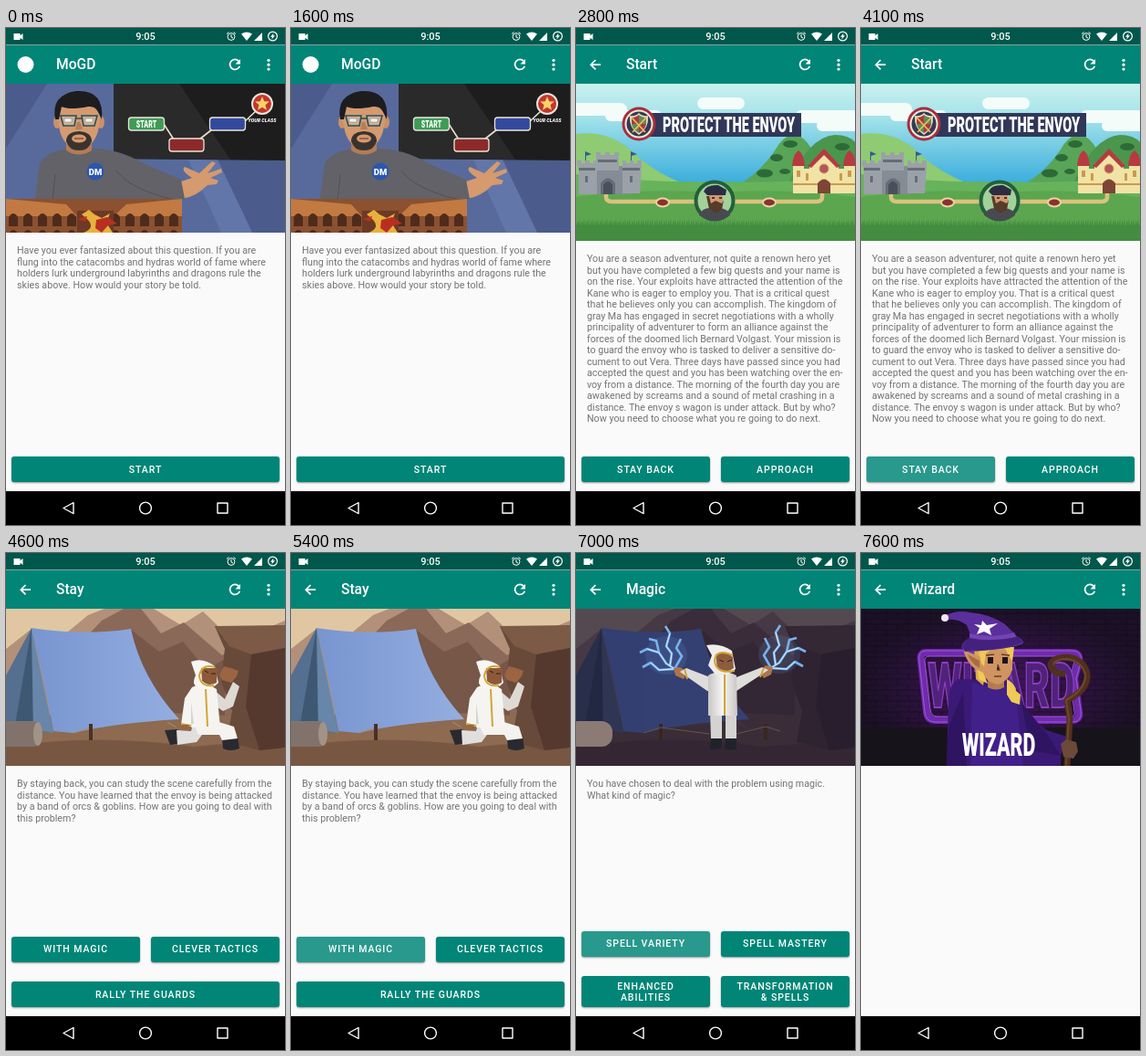
An HTML page that plays this animation: 306x544 px, repeating every 8000 ms.

```html
<!DOCTYPE html>
<html lang="en">
<head>
<meta charset="utf-8">
<title>Story app</title>
<style>
html, body { margin: 0; width: 100%; height: 100%; overflow: hidden; background: #000 }
#stage { position: absolute; left: 0; top: 0; width: 306px; height: 544px; overflow: hidden; font-family: Roboto, sans-serif }
.scr { position: absolute; left: 0; top: 0; width: 306px; height: 507px; overflow: hidden; background: #fafafa }
#start, #back { animation: start 8s step-end infinite }
#stay { animation: stay 8s step-end infinite }
#magic { animation: magic 8s step-end infinite }
#wizard { animation: wizard 8s step-end infinite }
#badge { animation: badge 8s step-end infinite }
@keyframes start { 0% { visibility: hidden } 32.5%, 100% { visibility: visible } }
@keyframes stay { 0% { visibility: hidden } 52.5%, 100% { visibility: visible } }
@keyframes magic { 0% { visibility: hidden } 70%, 100% { visibility: visible } }
@keyframes wizard { 0% { visibility: hidden } 88.75%, 100% { visibility: visible } }
@keyframes badge { 0% { visibility: visible } 32.5%, 100% { visibility: hidden } }
h1 { position: absolute; left: 0; top: 18.5px; width: 251px; height: 42.5px; margin: 0; padding-left: 55px; background: #008577; color: #fff; font: 500 15.6px/43.5px Roboto, sans-serif }
.art { position: absolute; left: 0; top: 61px }
p { position: absolute; left: 12px; top: 247px; margin: 0; color: #737373; font-size: 10.7px; line-height: 12.53px; white-space: nowrap }
#home p { top: 238px }
.btn { position: absolute; box-sizing: border-box; left: 6px; top: 469px; width: 141px; height: 28px; padding-top: 1px; border-radius: 3px; overflow: hidden; background: #008577; color: #fff; box-shadow: 0 1px 2px #0006; font-weight: 500; font-size: 10.5px; line-height: 12px; letter-spacing: .0893em; display: flex; align-items: center; justify-content: center; text-align: center }
.r { left: 159px }
.wide { width: 294px }
.tall { top: 463px; height: 34px }
.mid { top: 419.5px }
.high { top: 413.5px }
.tap::before, .tap::after { content: ""; position: absolute; background: #fff; opacity: 0; animation: 8s linear var(--at) infinite }
.tap::before { inset: 0; animation-name: glow }
.tap::after { left: var(--x); top: 14px; width: 190px; height: 190px; margin: -95px; border-radius: 50%; animation-name: ripple }
@keyframes glow { 0% { opacity: 0 } 1.5%, 6.25% { opacity: .1 } 6.3%, 100% { opacity: 0 } }
@keyframes ripple { 0% { opacity: .07; transform: scale(.1) } 5%, 6.25% { opacity: .07; transform: none } 6.3%, 100% { opacity: 0 } }
#chrome { position: absolute; left: 0; top: 0 }
.cond { font: 900 20px Roboto, sans-serif; transform-box: fill-box; transform-origin: center; transform: scaleX(.62); text-anchor: middle }
</style>
</head>
<body>
<div id="stage">

<section class="scr" id="home">
  <h1>MoGD</h1>
  <svg class="art" width="306" height="163" viewBox="0 61 306 163">
    <path fill="#586a9c" d="M0 61H306V224H0Z"/>
    <path fill="#4b5b8b" d="M0 61H45L0 132ZM232 144H306V224H270Z"/>
    <path fill="#6376a9" d="M200 144H232L270 224H236Z"/>
    <path fill="#1d1d1e" d="M118 61H306V145L118 143Z"/>
    <path fill="#2a2a2b" d="M118 61H190L246 144 118 143Z"/>
    <path fill="none" stroke="#e8e0cc" stroke-width="1.6" d="M173 105 184 122M212 122 226 111M260 104 274 91"/>
    <g stroke="#e9e5da" stroke-width="1.3">
      <rect x="134.5" y="98" width="39" height="14" rx="3" fill="#3f9b56"/>
      <rect x="179" y="121" width="38" height="14" rx="3" fill="#8c2a2a"/>
      <rect x="223.5" y="98" width="39" height="14" rx="3" fill="#334a9c"/>
      <circle cx="281" cy="83" r="11" fill="#c4352d" stroke-width="2"/>
    </g>
    <path fill="#f6d36a" d="M281 75l2.2 5.2 5.6.4-4.3 3.7 1.4 5.5-4.9-3-4.9 3 1.4-5.5-4.3-3.7 5.6-.4z"/>
    <text class="cond" x="154" y="109" fill="#fff" style="font-size:11.5px">START</text>
    <text x="281" y="102.5" fill="#fff" text-anchor="middle" font-size="5.3" font-weight="800" font-style="italic">YOUR CLASS</text>
    <path fill="#d59a6d" d="M192 168 204 164Q191 156 196 152L212 159 226 146 230 148 221 159 236 154 237 158 224 164 233 167 231 171 221 172Q208 185 193 187Z"/>
    <path fill="#626268" d="M66 132Q44 136 37 148L31 192H185L196 187 192 166 150 148Q124 132 94 132 80 142 66 132Z"/>
    <path fill="none" stroke="#515158" d="M54 160 51 190M121 156Q135 176 184 188"/>
    <path fill="#b47c55" d="M66 116H94V134Q80 143 66 134Z"/>
    <g fill="#ca9069"><ellipse cx="56" cy="103" rx="4" ry="7"/><ellipse cx="104" cy="103" rx="4" ry="7"/></g>
    <path fill="#d59a6f" d="M57 90Q56 118 68 128 80 136 92 128 104 118 103 90 80 70 57 90Z"/>
    <path fill="#1d1d20" d="M54 100Q49 73 77 69 108 67 105 100L101 92Q98 85 90 86 70 90 61 86L58 100Z"/>
    <path fill="#39332f" d="M66 124Q66 114 80 113 94 114 94 124 91 134 80 134 69 134 66 124Z"/>
    <ellipse cx="80" cy="121" rx="8" ry="4.5" fill="#d59a6f"/>
    <path stroke="#8f4d40" stroke-width="1.5" d="M75 121H85"/>
    <path fill="#fff" stroke="#6f4630" stroke-width=".5" d="M64 99H72V103H64ZM87 99H95V103H87Z"/>
    <path fill="#bde0e255" stroke="#28505b" stroke-width="1.6" d="M60 96H77L75 107H63ZM83 96H100L97 107H85ZM77 99H83"/>
    <path fill="#b57f57" d="M78 103 76 111H84L81 103Z"/>
    <circle cx="98" cy="157" r="9.5" fill="#2b57ae"/>
    <text x="98" y="160.5" fill="#fff" text-anchor="middle" font-size="9.5" font-weight="900">DM</text>
    <pattern id="arch" width="16" height="18" y="199" patternUnits="userSpaceOnUse"><path fill="#4f2b1b" d="M3 18V8Q8 0 13 8V18Z"/></pattern>
    <path fill="#8b5130" d="M0 187H193V224H0Z"/>
    <path fill="#c27a42" d="M0 187 66 193 78 206H0ZM193 187 132 193 118 206H193Z"/>
    <path fill="url(#arch)" d="M0 199H78V224H0ZM116 199H193V224H116Z"/>
    <path fill="#6c3a25" d="M78 200H118V224H78Z"/>
    <path fill="#e9b13c" d="M83 204 91 199 97 204 105 208 114 203 110 213 117 224H85Q98 219 90 210Z"/>
    <path fill="#b82f22" d="M99 210 111 207 122 214 112 216 105 224 98 219ZM78 209 89 206 87 212Z"/>
  </svg>
  <p>Have you ever fantasized about this question. If you are<br>flung into the catacombs and hydras world of fame where<br>holders lurk underground labyrinths and dragons rule the<br>skies above. How would your story be told.</p>
  <div class="btn wide tap" style="--at:2.1s;--x:182px">START</div>
</section>

<section class="scr" id="start">
  <h1>Start</h1>
  <svg class="art" width="306" height="172" viewBox="0 61 306 172">
    <linearGradient id="sky" x2="0" y2="1"><stop stop-color="#c9f1ee"/><stop offset=".22" stop-color="#a2e2ea"/><stop offset=".65" stop-color="#36abdc"/></linearGradient>
    <path fill="url(#sky)" d="M0 61H306V233H0Z"/>
    <g fill="#f4fcfa">
      <rect x="133" y="76" width="52" height="13" rx="6.5"/>
      <rect x="-8" y="82" width="64" height="14" rx="7"/>
      <rect x="32" y="90" width="62" height="12" rx="6"/>
      <rect x="240" y="90" width="76" height="14" rx="7"/>
      <rect x="264" y="101" width="60" height="12" rx="6"/>
    </g>
    <path fill="#8fcb73" d="M0 116Q34 112 58 132 84 158 122 172H0Z"/>
    <path fill="#58a557" d="M178 172Q206 155 222 128 238 106 254 126L285 172Z"/>
    <path fill="#4a964c" d="M232 172Q255 119 284 117 299 117 306 125V172Z"/>
    <g fill="#2d6a38">
      <ellipse cx="235" cy="127" rx="8" ry="4"/><ellipse cx="220" cy="142" rx="7" ry="4"/>
      <ellipse cx="207" cy="159" rx="9" ry="4.5"/><ellipse cx="292" cy="130" rx="8" ry="4"/>
      <ellipse cx="229" cy="157" rx="6" ry="3"/>
    </g>
    <path fill="#67b35c" d="M0 160Q80 170 153 168 230 171 306 162V233H0Z"/>
    <path fill="#5ca650" d="M0 185Q70 175 153 180 230 175 306 185V233H0Z"/>
    <path fill="none" stroke="#dcc17e" stroke-width="4.500" stroke-linejoin="round" d="M33 180V185Q33 190 39 190H264Q270 190 270 185V178"/>
    <path fill="#438c40" d="M0 216H306V233H0Z"/>
    <pattern id="grass" width="5" height="9" y="208" patternUnits="userSpaceOnUse"><path fill="#438c40" d="M0 9 2 2 3 8 4 0 5 9Z"/></pattern>
    <path fill="url(#grass)" d="M0 208H306V217H0Z"/>
    <g fill="#8e2f2d" stroke="#ead5a4" stroke-width="2"><ellipse cx="95" cy="191" rx="7" ry="4.5"/><ellipse cx="212" cy="191" rx="7" ry="4.5"/></g>

    <path fill="#868c95" d="M17 151H57V182H17Z"/>
    <path fill="#9ba1a8" d="M1 150V145H6V148H10V145H15V148H19V145H23V182H3V153ZM51 150V145H55V148H59V145H63V148H67V145H72V153L70 181H51ZM22 140V136H27V139H32V136H37V139H42V136H47V156H22Z"/>
    <path fill="#666d77" d="M3 153H21V156H3ZM51 153H70V156H51ZM24 144H45V147H24ZM27 182V170Q35 159 43 170V182ZM10 162H13V169H10ZM59 162H62V169H59Z"/>
    <path fill="#48505c" d="M30 182V172Q35 164 40 172V182Z"/>
    <path fill="#3e568f" d="M10 145V135L17 138 11 140V145ZM60 145V135L67 138 61 140V145Z"/>
    <path fill="#f1e3a5" d="M244 154H302V181H244ZM238 150H250V181H238ZM294 150H306V181H294ZM256 149 272 135 288 149V181H256Z"/>
    <path fill="#b73a41" d="M237 151Q238 138 244 134 250 138 251 151ZM293 151Q294 138 300 134 306 138 307 151ZM254 151 272 132 290 151 286 153 272 139 258 153Z"/>
    <path fill="#c99a50" d="M238 170H306V172H238ZM242 156H246V163H242ZM298 156H302V163H298ZM252 159H255V167H252ZM289 159H292V167H289Z"/>
    <path fill="#7c4536" d="M265 181V170Q272 161 279 170V181Z"/>
    <circle cx="272" cy="154" r="5" fill="#b6525e" stroke="#c99a50"/>

    <circle cx="152" cy="189" r="20.5" fill="#a4d09a" stroke="#235f3b" stroke-width="4"/>
    <path fill="#494a51" d="M135 205Q138 197 147 197H158Q167 198 169 205 153 217 135 205Z"/>
    <path fill="#d09a72" d="M145 181H161V194Q153 204 145 194Z"/>
    <path fill="#573b2b" d="M143 184H146L148 192 153 189 160 192 162 188 160 199 153 203 146 198Z"/>
    <path fill="#2b2e42" d="M140 179Q143 171 156 172L165 177 164 183H144Z"/>
    <path stroke="#1d1815" stroke-width="1.5" d="M149 186H152M157 186H160"/>

    <path fill="#303758" d="M80 93H247V119H80Z"/>
    <circle cx="69" cy="105" r="18.5" fill="#a72e3c"/>
    <circle cx="69" cy="105" r="14.5" fill="#343b53" stroke="#eee8dd" stroke-width="2"/>
    <path fill="#eadfbd" d="M59 96Q65 97 69 93 73 97 79 96 80 110 69 117 58 110 59 96Z"/>
    <path fill="#a93940" d="M61 98Q66 98 69 95V105H61ZM69 105H77Q76 111 69 115Z"/>
    <path fill="#608a57" d="M69 95Q72 98 77 98V105H69ZM61 105H69V115Q62 111 61 105Z"/>
    <path stroke="#e6be59" stroke-width="1.8" d="M61 98 76 114M77 98 62 114"/>
    <text class="cond" x="167.5" y="114.500" fill="#fff" style="font-size:23.5px">PROTECT THE ENVOY</text>
  </svg>
  <p>You are a season adventurer, not quite a renown hero yet<br>but you have completed a few big quests and your name is<br>on the rise. Your exploits have attracted the attention of the<br>Kane who is eager to employ you. That is a critical quest<br>that he believes only you can accomplish. The kingdom of<br>gray Ma has engaged in secret negotiations with a wholly<br>principality of adventurer to form an alliance against the<br>forces of the doomed lich Bernard Volgast. Your mission is<br>to guard the envoy who is tasked to deliver a sensitive do-<br>cument to out Vera. Three days have passed since you had<br>accepted the quest and you has been watching over the en-<br>voy from a distance. The morning of the fourth day you are<br>awakened by screams and a sound of metal crashing in a<br>distance. The envoy s wagon is under attack. But by who?<br>Now you need to choose what you re going to do next.</p>
  <div class="btn tap" style="--at:3.7s;--x:70px">STAY BACK</div>
  <div class="btn r">APPROACH</div>
</section>

<section class="scr" id="stay">
  <h1>Stay</h1>
  <svg class="art" width="306" height="172" viewBox="0 61 306 172">
    <defs>
      <linearGradient id="tent"><stop stop-color="#7895d0"/><stop offset="1" stop-color="#94aee0"/></linearGradient>
      <g id="camp">
        <path fill="#e0c7a2" d="M0 61H306V233H0Z"/>
        <path fill="#b29079" d="M0 105 28 83 56 96 90 68 108 61H162L192 79 216 64 250 97 306 74V185H0Z"/>
        <path fill="#8b6959" d="M65 116 105 74 129 61H148L170 88 195 76 237 112 270 90 306 122V190H60Z"/>
        <path fill="#765748" d="M136 83 168 108 194 97 220 128 240 116V190H170Z"/>
        <path fill="#8d6a50" d="M0 181Q150 167 306 183V233H0Z"/>
        <path fill="#785742" d="M0 212Q100 197 206 212 257 205 306 214V233H0Z"/>
        <path fill="#684a3a" d="M229 80 260 82 306 79V213L278 216 242 207 248 173 236 140 240 105Z"/>
        <path fill="#7c5a46" d="M229 80 306 79V104L269 111 245 102Z"/>
        <path fill="#55392f" d="M269 111 306 104V213L278 216 263 168Z"/>
        <path fill="#546f8f" d="M28 82 0 134V190L48 197Z"/>
        <path fill="#3e5873" d="M28 82 10 188 30 193Z"/>
        <path fill="#6886a9" d="M28 82 30 193 52 197Z"/>
        <path id="canvas" fill="url(#tent)" d="M28 82Q85 91 137 83 148 136 190 182 119 186 74 197L52 195Q42 139 28 82Z"/>
        <path fill="none" stroke="#ac8e6e" d="M74 197 93 191M177 185 187 191"/>
        <path fill="#4b3023" d="M91 187H95V205H91Z"/>
      </g>
    </defs>
    <use href="#camp"/>
    <rect x="-10" y="184" width="50" height="28" rx="10" fill="#81736c"/>
    <ellipse cx="35" cy="198" rx="5" ry="13" fill="#a29389"/>
    <path fill="#292a30" d="M174 194 188 193 193 208 180 210ZM237 202 254 201 256 214Q246 218 238 214Z"/>
    <path fill="#e0dfdd" d="M206 184 224 187 209 207 188 210 187 194 203 195Z"/>
    <path fill="#f4f3f0" d="M205 184H230L250 190 254 203 237 205 234 199 211 199Z"/>
    <path fill="#dddad4" d="M227 149 240 160 249 141 256 146 249 168 238 173 225 164Z"/>
    <path fill="#f5f4f1" d="M204 147Q217 139 231 149L235 191H203L205 174 203 190 192 188 196 159Z"/>
    <path fill="#d8d4cb" d="M203 163 206 187H203Z"/>
    <path fill="#f7f6f2" d="M203 119Q216 114 229 124L233 142Q226 150 214 148 202 146 208 134Z"/>
    <path fill="#8c593b" d="M214 126H232L231 142Q222 147 215 140Z"/>
    <path fill="none" stroke="#d2a534" stroke-width="2" d="M229 125Q215 121 212 134 213 147 228 145M219 149 221 190M192 187 203 189"/>
    <path fill="#9b6442" d="M234 133 239 124 247 126 255 129 253 135 247 142 237 139Z"/>
    <path stroke="#342117" d="M225 132H230M218 129 222 131"/>
    <path fill="#9b6442" d="M193 188H201L199 194 194 193Z"/>
  </svg>
  <p>By staying back, you can study the scene carefully from the<br>distance. You have learned that the envoy is being attacked<br>by a band of orcs &amp; goblins. How are you going to deal with<br>this problem?</p>
  <div class="btn mid tap" style="--at:5.1s;--x:70px">WITH MAGIC</div>
  <div class="btn mid r">CLEVER TACTICS</div>
  <div class="btn wide">RALLY THE GUARDS</div>
</section>

<section class="scr" id="magic">
  <h1>Magic</h1>
  <svg class="art" width="306" height="172" viewBox="0 61 306 172">
    <use href="#camp"/>
    <path fill="#17122e" opacity=".69" d="M0 61H306V233H0Z"/>
    <path fill="#33417c" opacity=".65" d="M28 82Q85 91 137 83 148 136 190 182 119 186 74 197L52 195Q42 139 28 82Z"/>
    <rect x="-10" y="184" width="50" height="28" rx="12" fill="#8c7a75"/>
    <path fill="#382620" d="M91 187H95V205H91ZM206 187H210V205H206Z"/>
    <path fill="none" stroke="#64554c" d="M74 197 93 191 146 198M176 198 208 190 224 195"/>
    <g id="bolt">
      <ellipse cx="99" cy="112" rx="23" ry="21" fill="#6ea3e8" opacity=".14"/>
      <path fill="none" stroke="#77b3ed" stroke-width="2.6" stroke-linejoin="round" d="M110 128 99 121 91 109 78 105 70 109M103 124 105 110 99 102 103 88 98 80M107 127 91 128 82 120 73 125M108 127 116 113 110 104 115 94M91 109 88 96 80 94"/>
      <path fill="none" stroke="#d4edff" d="M110 128 99 121 91 109 78 105M103 124 105 110 99 102 103 88M107 127 91 128 82 120"/>
    </g>
    <use href="#bolt" transform="matrix(-1 0 0 1 322 -1)"/>
    <path fill="#ad754e" d="M107 126 114 125 122 130 118 138 109 134ZM216 125 208 123 201 130 206 137 214 133Z"/>
    <path fill="#deddda" d="M114 130 121 126 147 136 154 151 144 151ZM211 128 204 125 176 136 165 150 176 151Z"/>
    <path fill="#20222a" d="M148 202H160V213Q152 217 147 214ZM164 202H176V214Q169 217 163 214Z"/>
    <path fill="#d5d3d1" d="M147 172H160V203H148ZM164 172H176V203H164Z"/>
    <linearGradient id="robe"><stop stop-color="#c9c6c5"/><stop offset=".5" stop-color="#f7f6f4"/><stop offset="1" stop-color="#c9c5c3"/></linearGradient>
    <path fill="url(#robe)" d="M145 134Q159 126 176 134L177 178H145Z"/>
    <path fill="#efeeeb" d="M143 101Q158 98 171 107L175 127Q166 136 153 133L145 123 149 112Z"/>
    <path fill="#8e5c40" d="M153 111Q165 107 172 114L173 126Q163 133 155 126Z"/>
    <path fill="none" stroke="#d1a434" stroke-width="2" d="M172 112Q153 104 152 118 154 133 174 129M163 133V178M119 127 122 138M206 126 202 136"/>
    <path stroke="#332017" d="M157 117 162 119M166 119 171 117"/>
  </svg>
  <p>You have chosen to deal with the problem using magic.<br>What kind of magic?</p>
  <div class="btn high tap" style="--at:6.6s;--x:70px">SPELL VARIETY</div>
  <div class="btn high r">SPELL MASTERY</div>
  <div class="btn tall">ENHANCED<br>ABILITIES</div>
  <div class="btn tall r">TRANSFORMATION<br>&amp; SPELLS</div>
</section>

<section class="scr" id="wizard">
  <h1>Wizard</h1>
  <svg class="art" width="306" height="172" viewBox="0 61 306 172">
    <radialGradient id="dark"><stop stop-color="#42165f"/><stop offset="1" stop-color="#1c1026"/></radialGradient>
    <pattern id="brick" width="24" height="12" patternUnits="userSpaceOnUse"><path fill="none" stroke="#08060c" opacity=".4" d="M0 0H24M0 6H24M4 0V6M16 6V12"/></pattern>
    <path fill="url(#dark)" d="M0 61H306V233H0Z"/>
    <path fill="url(#brick)" d="M0 61H306V233H0Z"/>
    <path fill="#17131b" d="M0 191H306V233H0Z"/>
    <g fill="none" stroke-linejoin="round">
      <path stroke="#6e2bac" stroke-width="8" d="M71 109H231Q241 109 239 119L234 137 239 173Q241 183 231 183H82Q73 183 72 174L66 119Q64 109 71 109Z"/>
      <path stroke="#a853dc" d="M71 107H231Q243 107 241 119L236 137 241 173Q243 185 231 185H82Q71 185 70 174L64 119Q62 107 71 107ZM75 113H229Q235 113 234 119L229 137 234 173Q236 179 229 179H84Q77 179 76 172L70 119Q69 113 75 113Z"/>
    </g>
    <text class="cond" x="154" y="169" fill="#50237a" stroke="#8e3cc4" stroke-width="2" style="font-size:69px">WIZARD</text>
    <path fill="#3a1a76" d="M107 138Q97 143 96 158L94 233H219V222L226 201 204 194 183 178 173 151 161 139Z"/>
    <path fill="#42208a" d="M122 142 147 149 162 143 171 166 178 233H120Z"/>
    <path fill="#2f1462" d="M112 153 116 233H94L96 190ZM176 164 204 198 219 222 186 216Z"/>
    <path fill="#d9ac4c" d="M124 104H165L166 128 160 134H136L134 145 126 138Z"/>
    <path fill="#b37c50" d="M139 136H157V147Q148 152 139 147Z"/>
    <path fill="#cf945f" d="M112 106 132 114V106H166V126Q164 139 150 144 137 141 132 130 118 126 112 106Z"/>
    <path fill="#a56c45" d="M117 111 130 118V126Q121 121 117 111Z"/>
    <path fill="#f0c956" d="M128 102H147L137 110 135 124 132 121ZM157 103H168L166 119ZM128 128 134 131 139 143 129 138ZM160 138Q170 144 170 151L175 155 174 166 165 163 160 155Z"/>
    <path fill="#1b1320" d="M139 114H145V121H139ZM155 114H161V121H155Z"/>
    <path stroke="#67402d" stroke-width="1.4" d="M137 112 146 111M154 111 163 112M146 135H154M150 122 152 128H149"/>
    <path fill="#5a2f9c" d="M91 69Q105 62 119 65 139 66 158 78L172 92Q179 95 178 99 164 106 114 108 107 104 113 97L121 92 116 79Q104 70 91 74Z"/>
    <path fill="#44217d" d="M120 91Q141 96 171 91L178 97Q162 106 115 107 109 103 113 98Z"/>
    <path fill="#7343b3" d="M119 88Q143 94 168 87L170 92Q143 98 119 93Z"/>
    <circle cx="92" cy="71" r="4" fill="#efe9f5"/>
    <path fill="#fff" d="M133 74 138 79 150 77 141 83 143 90 135 86 127 89 130 82 124 78 132 79Z"/>
    <path fill="none" stroke="#51301f" stroke-width="7" stroke-linecap="round" stroke-linejoin="round" d="M226 233 229 181 226 161Q249 150 248 133 245 116 226 114 211 114 208 122 210 132 221 132"/>
    <path fill="none" stroke="#704629" stroke-width="2" stroke-linecap="round" d="M225 232 228 181 225 161Q247 149 246 133 242 118 226 116 213 116 211 122"/>
    <path fill="#6b4a3a" d="M219 209 225 204 236 207 238 217 233 225 222 223Z"/>
    <text class="cond" x="151" y="222" fill="#fff" style="font-size:34.5px">WIZARD</text>
  </svg>
</section>

<svg id="chrome" width="306" height="544" fill="#fff">
  <path fill="#00574b" d="M0 0H306V18.5H0Z"/>
  <path fill="#000" d="M0 507H306V544H0Z"/>
  <path d="M8.5 6H15.5V8.3L18.5 6V13L15.5 10.7V13H8.5Z"/>
  <text x="153" y="13.3" text-anchor="middle" font-family="Roboto, sans-serif" font-size="11" font-weight="500">9:05</text>
  <g fill="none" stroke="#fff">
    <circle cx="247" cy="9.5" r="3.9"/>
    <path d="M247 7V10L249 11M242 6.5 244.5 4.5M252 6.5 249.5 4.5"/>
    <circle cx="292.5" cy="9" r="4.9" stroke-width="1.2"/>
  </g>
  <path d="M258 6.5Q264 2.5 270 6.5L264 14ZM272 14 281 5V14ZM293.5 5.5 290 9.8H292L291.3 12.7 295 8.3H293Z"/>
  <path fill="none" stroke="#fff" stroke-width="1.7" d="M255.2 36.2A5.5 5.5 0 1 0 256.3 41.8"/>
  <path d="M257 34V39.5H251.5Z"/>
  <circle cx="288" cy="35.3" r="1.6"/><circle cx="288" cy="40.2" r="1.6"/><circle cx="288" cy="45.1" r="1.6"/>
  <g fill="none" stroke="#fff" stroke-width="1.4" stroke-linejoin="round">
    <path d="M63 525.5 74 519.5V531.5ZM232 520H243V531H232Z"/>
    <circle cx="153" cy="525.5" r="6.4"/>
  </g>
  <path id="back" fill="none" stroke="#fff" stroke-width="1.7" d="M27 40.2H16.5M21.5 35 16.3 40.2 21.5 45.4"/>
  <circle id="badge" cx="21.5" cy="40" r="9"/>
</svg>
</div>
</body>
</html>
```
